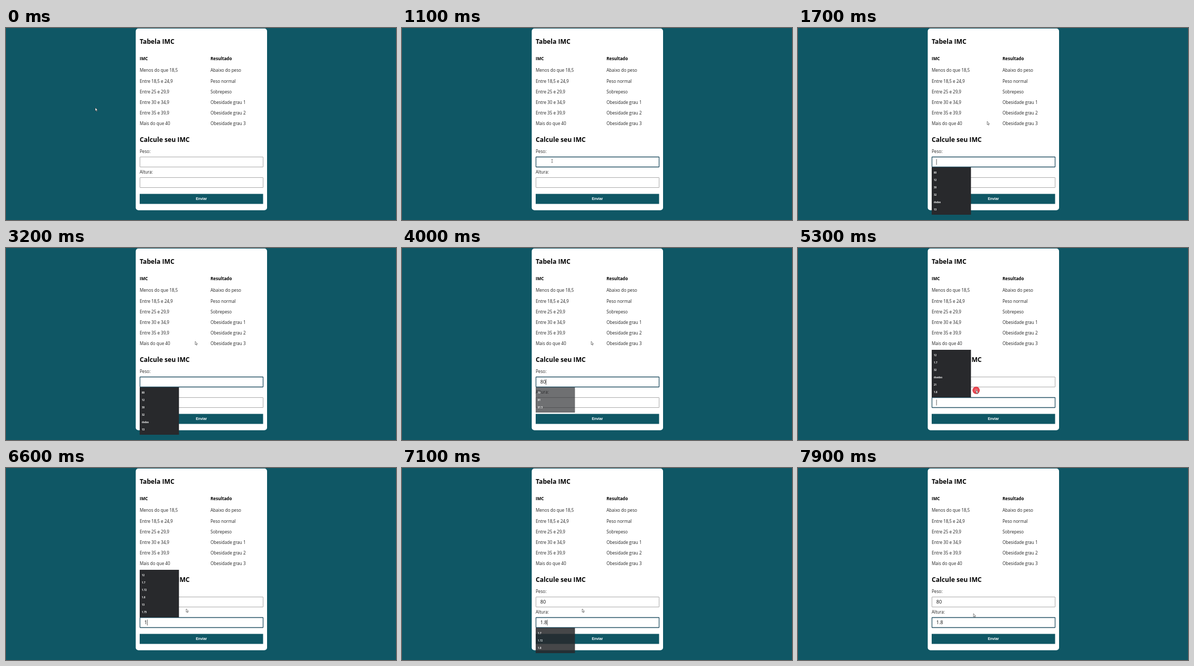
An HTML page for the animation above (8 s loop, 738 by 364 pixels).

```html
<!DOCTYPE html>
<html lang="pt">
<head>
<meta charset="utf-8">
<title>Tabela IMC</title>
<style>
  html, body { margin: 0; width: 100%; height: 100%; overflow: hidden; background: #0f5765; }
  svg { display: block; width: 738px; height: 364px; }
  text { font: 8.1px "Open Sans", sans-serif; fill: #222; white-space: pre; }
  .head { font-weight: 700; fill: #000; }
  .title { font-size: 12.15px; font-weight: 700; fill: #000; }
  .value { font-size: 9.1px; fill: #111; }
  .button { font: 700 6.9px "Liberation Sans", Arial, sans-serif; fill: #fff; text-anchor: middle; }
  .option { font-size: 4.6px; font-weight: 700; fill: #f4f4f4; }
</style>
</head>
<body>
<svg id="stage" viewBox="0 0 738 364">
  <defs>
    <radialGradient id="glow">
      <stop offset="0" stop-color="#f08a90"/>
      <stop offset=".55" stop-color="#e8434d"/>
      <stop offset="1" stop-color="#e0313d"/>
    </radialGradient>
  </defs>
</svg>
<script>
const LOOP = 8000, STEP = 100;
const LEFT = 253, RIGHT = 387;
const GREY = [160, 160, 160], TEAL = [36, 82, 100];
const stage = document.getElementById('stage');

function add(tag, attrs, parent = stage) {
  const node = document.createElementNS('http://www.w3.org/2000/svg', tag);
  set(node, attrs);
  parent.append(node);
  return node;
}
function set(node, attrs) {
  for (const key in attrs) node.setAttribute(key, attrs[key]);
}
function label(x, y, content, cls = '', parent = stage) {
  const node = add('text', { x, y, class: cls }, parent);
  node.textContent = content;
  return node;
}
const clamp = v => Math.min(1, Math.max(0, v));
const mix = (a, b, p) => a + (b - a) * p;

// Static page
add('rect', { x: 245.5, y: 1, width: 248.5, height: 344.5, rx: 5, fill: '#fff' });
label(LEFT, 29.5, 'Tabela IMC', 'title');
label(LEFT, 61, 'IMC', 'head');
label(RIGHT, 61, 'Resultado', 'head');
[
  ['Menos do que 18,5', 'Abaixo do peso'],
  ['Entre 18,5 e 24,9', 'Peso normal'],
  ['Entre 25 e 29,9', 'Sobrepeso'],
  ['Entre 30 e 34,9', 'Obesidade grau 1'],
  ['Entre 35 e 39,9', 'Obesidade grau 2'],
  ['Mais do que 40', 'Obesidade grau 3']
].forEach(([range, result], i) => {
  const y = 83.3 + 20.2 * i;
  label(LEFT, y, range);
  label(RIGHT, y, result);
});
label(LEFT, 216.4, 'Calcule seu IMC', 'title');
label(LEFT, 236.7, 'Peso:');
label(LEFT, 276, 'Altura:');
add('rect', { x: 253, y: 314.5, width: 233.5, height: 19, fill: '#0f5765' });
label(369.7, 326, 'Enviar', 'button');

// Fields: focus interval, typed values, moments at which the caret restarts
const fields = [
  { top: 244.5, focus: [800, 4900], typed: [[3600, '8'], [3900, '80']],
    restarts: [600, 1400, 3600, 4000] },
  { top: 283.5, focus: [4900, LOOP], typed: [[6600, '1'], [6800, '1.'], [7000, '1.8']],
    restarts: [4900, 5300, 6600, 6800, 7100] }
];
for (const field of fields) {
  field.box = add('rect', { x: 253.5, y: field.top, width: 233, height: 19, rx: .5, fill: '#fff' });
  field.text = label(261.7, field.top + 12.9, '', 'value');
  field.caret = add('rect', { y: field.top + 4, width: .8, height: 11, fill: '#333' });
}

// Suggestion lists: top edge, open time, close time, fade length
const menus = [
  [264, 1400, 3600, 0, ['80', '12', '30', '32', 'dsdas', '13']],
  [264, 3600, 3900, 300, ['80', '81', '81.5']],
  [193, 5200, 6600, 0, ['12', '1.7', '32', 'dsadas', '21', '1.8']],
  [193, 6600, 6800, 0, ['12', '1.7', '1.72', '1.8', '13', '1.75']],
  [303, 6800, 7050, 350, ['1.7', '1.72', '1.8']]
].map(([top, open, close, fade, options]) => {
  const group = add('g', {});
  add('rect', { x: 253, y: top, width: 74.3, height: options.length * 14 + 6, rx: .5, fill: '#28292c' }, group);
  options.forEach((option, i) => label(257, top + 11.7 + 14 * i, option, 'option', group));
  return { group, open, close, fade };
});

// Pointer
const ripple = add('circle', { fill: 'url(#glow)' });
const arrow = add('path', {
  d: 'M0 0V6.3L1.4 5.1L2.4 7.3L3.4 6.8L2.4 4.7H4.3Z',
  fill: '#fff', stroke: '#333', 'stroke-width': .6, 'stroke-linejoin': 'round'
});
const beam = add('path', { d: 'M-1.5-3H1.5M0-3V3M-1.5 3H1.5', stroke: '#555', 'stroke-width': .7, fill: 'none' });
const path = [
  [0, 169, 151], [900, 282, 252], [1100, 284, 252], [1250, 284, 252], [1600, 358, 177],
  [4100, 358, 177], [4900, 288, 298], [5050, 288, 298], [5350, 341, 267],
  [7500, 341, 267], [7900, 332, 276], [LOOP, 332, 276]
];
const clicks = [1300, 5150];

function pointerAt(t) {
  const i = path.findIndex((key, n) => n && t <= key[0]);
  const [t0, x0, y0] = path[i - 1], [t1, x1, y1] = path[i];
  const p = (t - t0) / (t1 - t0), eased = p * p * (3 - 2 * p);
  return [mix(x0, x1, eased), mix(y0, y1, eased)];
}

function drawField(field, t) {
  const [start, end] = field.focus;
  const focused = t >= start && t < end;
  const strength = focused ? clamp((t - start) / 300) : 0;
  const color = GREY.map((g, i) => Math.round(mix(g, TEAL[i], strength)));
  set(field.box, { stroke: `rgb(${color})`, 'stroke-width': focused ? 1.3 : .9 });

  const typed = field.typed.filter(([at]) => at <= t).pop();
  field.text.textContent = typed ? typed[1] : '';
  const restart = field.restarts.filter(at => at <= t).pop();
  const lit = focused && (t - restart) % 1000 < 500;
  set(field.caret, {
    x: 261.7 + (typed ? field.text.getComputedTextLength() : 0),
    opacity: lit ? 1 : 0
  });
}

function draw(t) {
  fields.forEach(field => drawField(field, t));

  for (const { group, open, close, fade } of menus) {
    const opacity = t < open ? 0 : t < close ? 1 : fade ? clamp(1 - (t - close) / fade) : 0;
    set(group, { opacity });
  }

  const [x, y] = pointerAt(t);
  const overField = x > 253 && x < 487 && fields.some(f => y > f.top && y < f.top + 19);
  const transform = `translate(${x} ${y})`;
  set(arrow, { transform, opacity: overField ? 0 : 1 });
  set(beam, { transform, opacity: overField ? 1 : 0 });

  const click = clicks.find(at => t >= at && t < at + 350);
  const age = click === undefined ? 1 : (t - click) / 350;
  set(ripple, { cx: x, cy: y + .5, r: 5 + 4.5 * age, opacity: age < .5 ? .95 : 1.9 * (1 - age) });
}

const begin = performance.now();
function tick() {
  const elapsed = (performance.now() - begin) % LOOP;
  draw(Math.floor(elapsed / STEP) * STEP);
  requestAnimationFrame(tick);
}
tick();
</script>
</body>
</html>
```
